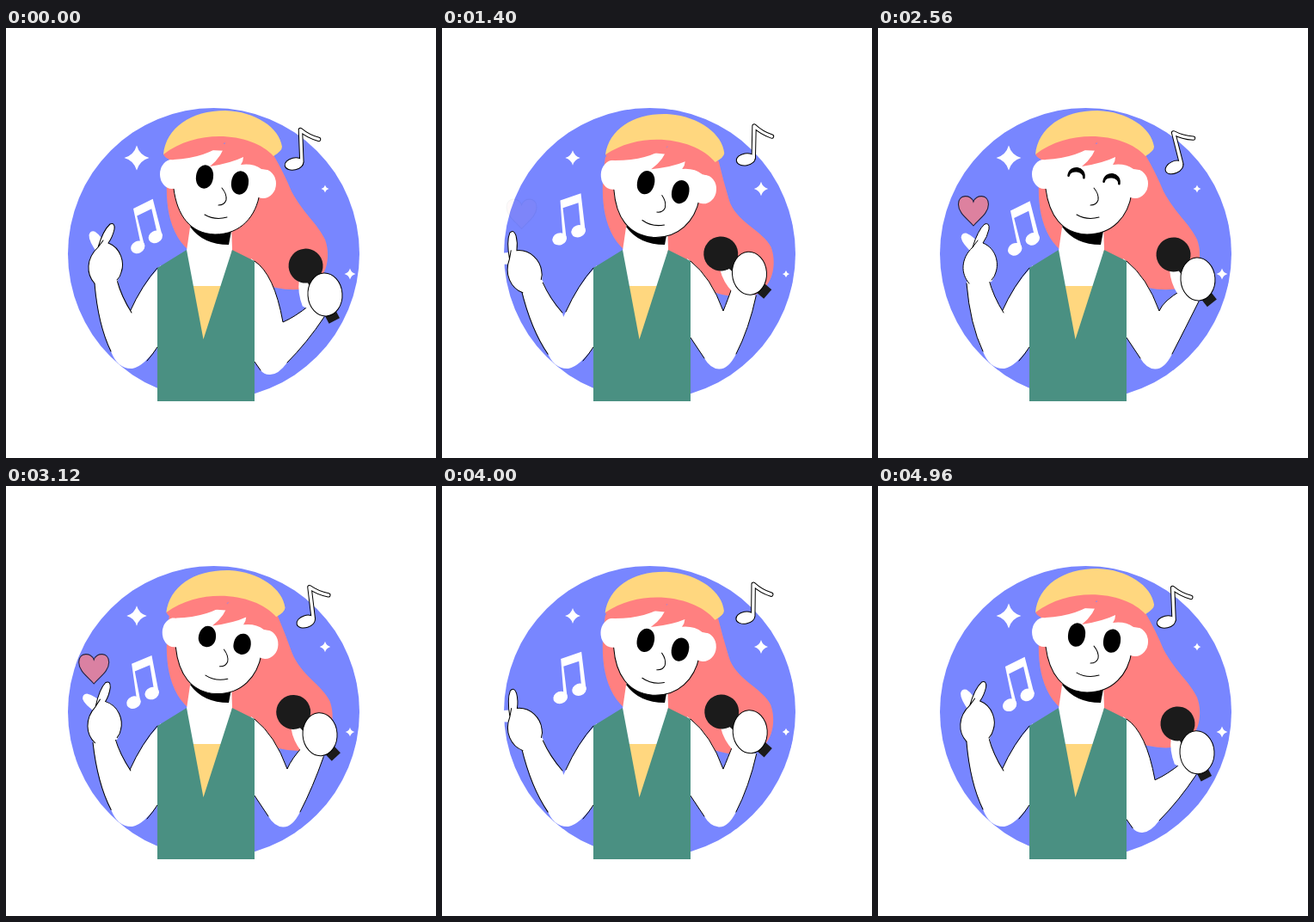
These frames come from a looping animation (500 px wide and 500 px high, 5.04 s). An HTML page:

```html
<!DOCTYPE html>
<html lang="en">
<head>
<meta charset="utf-8">
<title>Singer</title>
<style>
  html, body { margin: 0; height: 100%; overflow: hidden; background: #fff; }
  svg { display: block; width: 100vw; height: 100vh; }
  .white { fill: #fff; }
  .hair { fill: #ff8080; }
  .gold { fill: #ffd77f; }
  .vest { fill: #4a9082; }
  .mic { fill: #1b1b1b; }
  .line { fill: none; stroke: #000; stroke-width: 1; stroke-linecap: round; }
  .skin { fill: #fff; stroke: #000; stroke-width: 1; }
</style>
</head>
<body>
<svg viewBox="0 0 500 500">
  <defs>
    <path id="star" d="M0-1Q.22-.22 1 0Q.22.22 0 1Q-.22.22-1 0Q-.22-.22 0-1Z"/>
    <path id="stem" d="M9-2L9.500-39Q18-31 30-27"/>
  </defs>
  <circle cx="241.5" cy="262.5" r="169.5" fill="#7886ff"/>
  <use id="starA" href="#star" class="white"/>
  <use id="starB" href="#star" class="white"/>
  <use id="starC" href="#star" class="white"/>

  <g id="pair" class="white">
    <ellipse cx="-11" cy="23" rx="8.5" ry="7" transform="rotate(-20 -11 23)"/>
    <ellipse cx="11" cy="14" rx="8.5" ry="7" transform="rotate(-20 11 14)"/>
    <path d="M-10-22L14-30L19 14L14 15L11-19L-7-13L-3 23L-7 23Z"/>
  </g>
  <g id="single" stroke-linejoin="round" stroke-linecap="round">
    <use href="#stem" fill="none" stroke="#000" stroke-width="5.4"/>
    <ellipse class="skin" rx="11" ry="7" transform="rotate(-10)"/>
    <use href="#stem" fill="none" stroke="#fff" stroke-width="3.4"/>
  </g>

  <path id="backHair" class="hair"/>

  <path id="armFill" class="white"/>
  <path id="armLines" class="line"/>
  <g id="mic">
    <path class="white" d="M-15-28L-5-22L-6 8Q-18 12-25 0Q-23-17-15-28Z"/>
    <rect class="mic" x="-7" y="-28" width="14" height="60"/>
    <circle class="mic" cy="-40" r="20"/>
  </g>
  <ellipse id="fist" class="skin" rx="20" ry="25"/>

  <path class="white" d="M180 276Q158 299 144 330L122 376Q130 397 147 396Q160 394 180 366Z"/>
  <path class="line" d="M176 279Q158 299 144 330M164 387Q171 379 176 371"/>
  <g id="forearm">
    <path class="white" d="M103 295Q107 345 122 376L150 372L146 331Q133 312 129 290Z"/>
    <path class="line" d="M103 297Q107 345 122 376M129 293Q134 312 146 331"/>
    <g id="hand">
      <path id="thumb" class="white" d="M-6 4Q-8-14-4-20Q0-24 4-20Q8-12 7 4Z"/>
      <path class="white" d="M103 297C93 286 93 268 107 255Q113 235 121 228Q127 226 126 234Q124 243 119 250C134 256 138 273 134 284Q133 289 129 295Z"/>
      <path class="line" d="M103 297C93 286 93 268 107 255Q113 235 121 228Q127 226 126 234Q124 243 119 250C134 256 138 273 134 284Q133 289 129 293M107 255L113 247"/>
    </g>
  </g>
  <path id="heart" d="M0 17C-8 8-17.500 2-17.500-8C-17.500-20-3-20 0-11C3-20 17.500-20 17.500-8C17.500 2 8 8 0 17Z" fill="#ff8080" stroke="#000" stroke-width="1.100"/>

  <path class="white" d="M215 225L210 259L214 310H250L263 258L262 225Z"/>
  <path d="M214 231Q229 252 259 252L262 236V225H220Z"/>
  <path class="gold" d="M214 300H252L229.500 366Z"/>
  <path class="vest" d="M176 434V279L210 258L229.500 362L263 258L289 271V434Z"/>

  <g id="head">
    <path class="white" d="M195 140V187C199 218 214 239 243 240C273 240 291 219 295 192L302 145Z"/>
    <path class="line" d="M195 187C199 218 214 239 243 240C273 240 291 219 295 192"/>
    <ellipse class="white" cx="193" cy="170" rx="14" ry="17"/>
    <ellipse class="white" cx="299" cy="181" rx="15" ry="17"/>
    <path class="hair" d="M183 147Q187 154 195 153Q233 151 255 133Q252 149 237 161Q262 157 276 150Q276 155 273 159Q287 157 297 164L313 166L311 146Q260 105 200 128Z"/>
    <path class="gold" d="M183 147C186 116 215 96 255 96C290 97 318 116 321 138Q321 143 311 149C288 123 225 115 183 147Z"/>
    <g id="face">
      <path id="eyeL" stroke="#000" stroke-linejoin="round"/>
      <path id="eyeR" stroke="#000" stroke-linejoin="round"/>
      <path class="line" d="M251 186Q257 193 256 200Q254 206 247 206M231 217Q243 224 257 220"/>
    </g>
  </g>
</svg>
<script>
const LOOP = 5040, SWAY = LOOP / 2;
const el = id => document.getElementById(id);
const set = (id, name, value) => el(id).setAttribute(name, value);
const move = (id, value) => set(id, 'transform', value);
const mix = (a, b, k) => a + (b - a) * k;
const clamp = x => Math.max(0, Math.min(1, x));
const ease = (from, to, t) => (1 - Math.cos(Math.PI * clamp((t - from) / (to - from)))) / 2;

function drawHair(s) {
  const x = 12 * s, y = 9 * s;
  set('backHair', 'd', `M190 150C184 188 184 234 213 259L290 295
    Q328 ${309 + y} ${352 + x} ${302 + y}
    C${376 + x} ${290 + y} ${377 + x} ${262 + y} ${371 + x} ${246 + y}
    C${362 + x} ${227 + y} ${346 - x / 2} ${216 + y} ${332 + x / 8} ${190 + y}
    Q${323 + x / 3} ${168 + y} ${310 + x} ${146 + y}L230 130Z`);
}

function drawRightArm(s, up) {
  const hx = mix(371, 372 - 15 * s, up), hy = mix(310, 292 - 7 * s, up);
  const at = (x0, y0, x1, y1) => `${mix(x0, x1, up)} ${mix(y0, y1, up)}`;
  const inner = `Q${at(312, 286, 313, 290)} ${at(322, 342, 327, 329)}`;
  const wristIn = `Q${at(336, 336, 332, 317)} ${hx - 19} ${hy + 13}`;
  const wristOut = `${hx + mix(-1, 1 + 7 * s, up)} ${hy + 26}`;
  const bend = at(350, 366, 357, 350);
  const elbow = at(327, 389, 342, 379);
  const under = at(296, 398, 305, 384);
  const root = at(289, 388, 289, 360);
  set('armFill', 'd', `M285 268L289 271${inner}${wristIn}L${wristOut}Q${bend} ${elbow}
    Q${at(316, 404, 333, 397)} ${at(306, 403, 322, 396.5)}Q${at(300, 403, 312, 396)} ${under}L${root}H280Z`);
  set('armLines', 'd', `M289 271${inner}${wristIn}M${wristOut}Q${bend} ${elbow}M${under}L${root}`);
  move('mic', `translate(${hx} ${hy}) rotate(${mix(-27.5, -38.5 - 11 * s, up)}) translate(-4.5 0)`);
  move('fist', `translate(${hx} ${hy}) rotate(-4)`);
}

// An oval that folds into a smiling arch as shut goes to 1.
function drawEye(id, x, y, shut) {
  const side = mix(0, 4, shut), top = mix(-17, -9, shut), low = mix(17, -5, shut);
  set(id, 'd', `M-9 ${side}C-9 ${top} 9 ${top} 9 ${side}C9 ${low} -9 ${low} -9 ${side}Z`);
  set(id, 'stroke-width', mix(2, 2.6, shut));
  move(id, `translate(${x} ${y - 4 * shut}) rotate(8)`);
}

function star(id, x, y, r) {
  move(id, `translate(${x} ${y}) scale(${r})`);
}

function draw(now) {
  const t = now % LOOP;
  const m = Math.min(t, LOOP - t);
  const s = (1 - Math.cos(2 * Math.PI * t / SWAY)) / 2;
  const up = ease(0, 1100, m);
  const wave = ease(0, 1260, m) - ease(1260, 2160, m);
  const shut = ease(1780, 2120, t) - ease(2880, 3200, t);

  star('starA', 152, 151, mix(14.5, 8.5, s));
  star('starB', 371, 187, mix(4.5, 8.3, s));
  star('starC', 400, 286, mix(6.5, 4, s));
  move('pair', `translate(${161 + 6 * up - 20 * s} ${230.5 + 2.5 * up - 11 * s}) rotate(${-8 * (1 - s)})`);
  move('single', `translate(${335 + 9.5 * up + 9 * s} ${158 + 4 * up - 9.5 * s}) rotate(${-3 - 12 * up + 16 * s})`);

  drawHair(s);
  drawRightArm(s, up);
  move('forearm', `rotate(${-9.5 * wave} 143 370)`);
  move('hand', `translate(${3 * (up - wave)} 0) rotate(${-19 * wave} 116 296)`);
  move('thumb', `translate(110 256) rotate(${-30 - 12 * up - 23 * wave})`);

  move('heart', `translate(${111 - 19 * s} ${213 + 3.5 * (1 - ease(1900, 2500, t))})`);
  set('heart', 'opacity', 0.75 * clamp(Math.min((t - 1360) / 800, (3800 - t) / 700)));

  move('head', `rotate(${3.1 * s} 180 280)`);
  move('face', `translate(0 ${4.8 * s}) rotate(${2.5 * s} 250 190)`);
  drawEye('eyeL', 231, 173, shut);
  drawEye('eyeR', 272, 180, shut);
}

function frame(now) {
  draw(now);
  requestAnimationFrame(frame);
}
draw(0);
requestAnimationFrame(frame);
</script>
</body>
</html>
```
